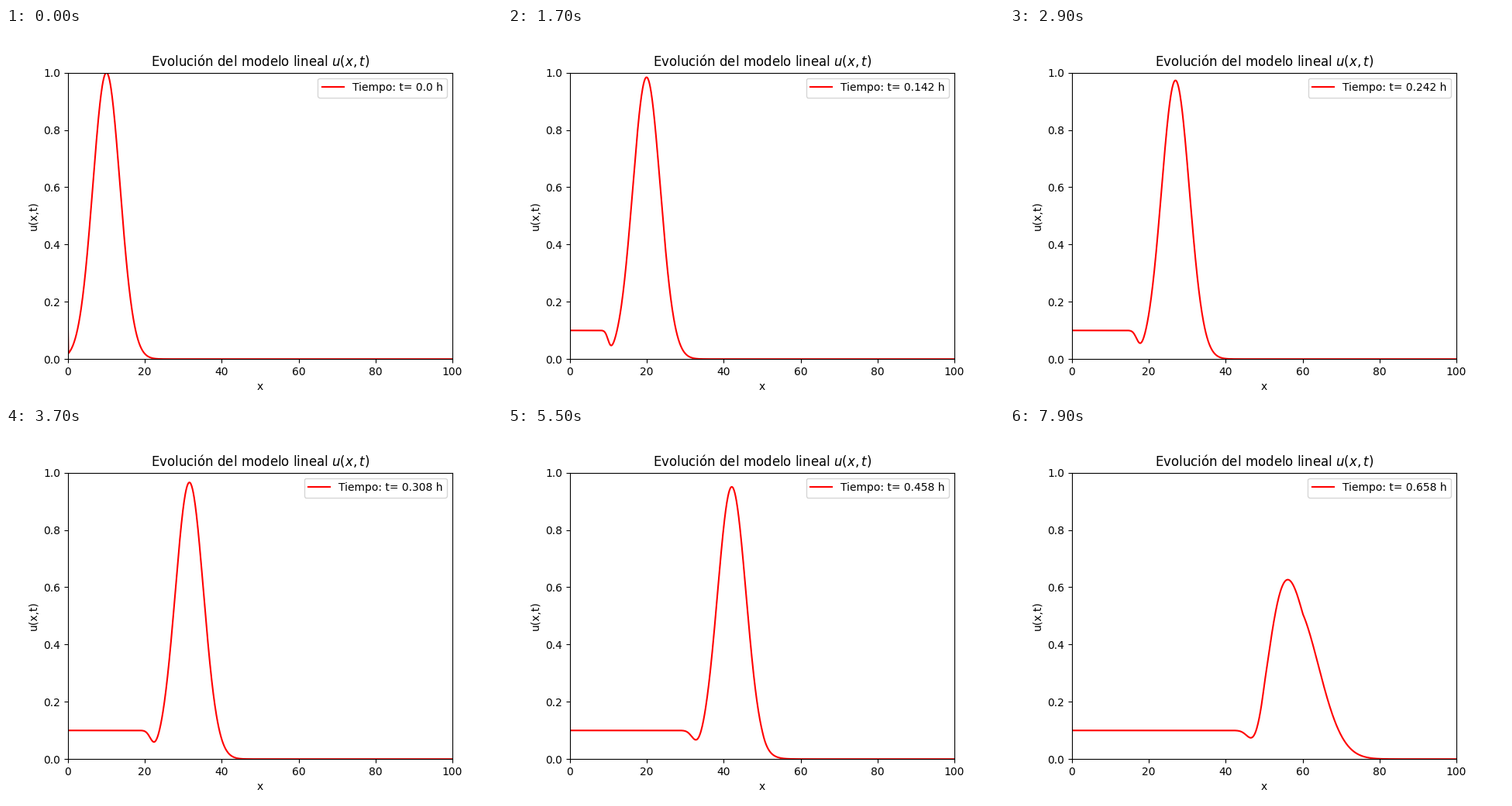
A matplotlib script that plays this animation: 640 by 480 pixels, repeating every 8 s.

```python
import numpy as np
import matplotlib.pyplot as plt
from matplotlib.animation import FuncAnimation

FRAMES = 80
STEPS = 10          # solver steps per frame
DX = 0.1
DT = DX / 120
INFLOW = 0.1

x = np.linspace(0, 100, 1001)
# Speed rises linearly from 70 to 120 between x = 50 and x = 60
v = np.interp(x, [50, 60], [70, 120])


def solve():
    """Upwind solution of u_t + (v u)_x = 0, one row per frame."""
    u = np.exp(-(x - 10) ** 2 / 25)
    u[0] = INFLOW
    rows = [u.copy()]
    for _ in range(FRAMES - 1):
        for _ in range(STEPS):
            u[1:] -= DT / DX * np.diff(v * u)
        rows.append(u.copy())
    return rows


waves = solve()

fig, ax = plt.subplots(figsize=(6.4, 4.8), dpi=100)
line, = ax.plot(x, waves[0], color="red", lw=1.5)
ax.set(xlim=(0, 100), ylim=(0, 1), xlabel="x", ylabel="u(x,t)")
ax.set_title("Evolución del modelo lineal $u(x,t)$")


def update(i):
    line.set_ydata(waves[i])
    line.set_label(f"Tiempo: t= {round(i * STEPS * DT, 3)} h")
    ax.legend(loc="upper right")
    return line,


anim = FuncAnimation(fig, update, frames=FRAMES, interval=100,
                     repeat=True, repeat_delay=0)
plt.show()
```
